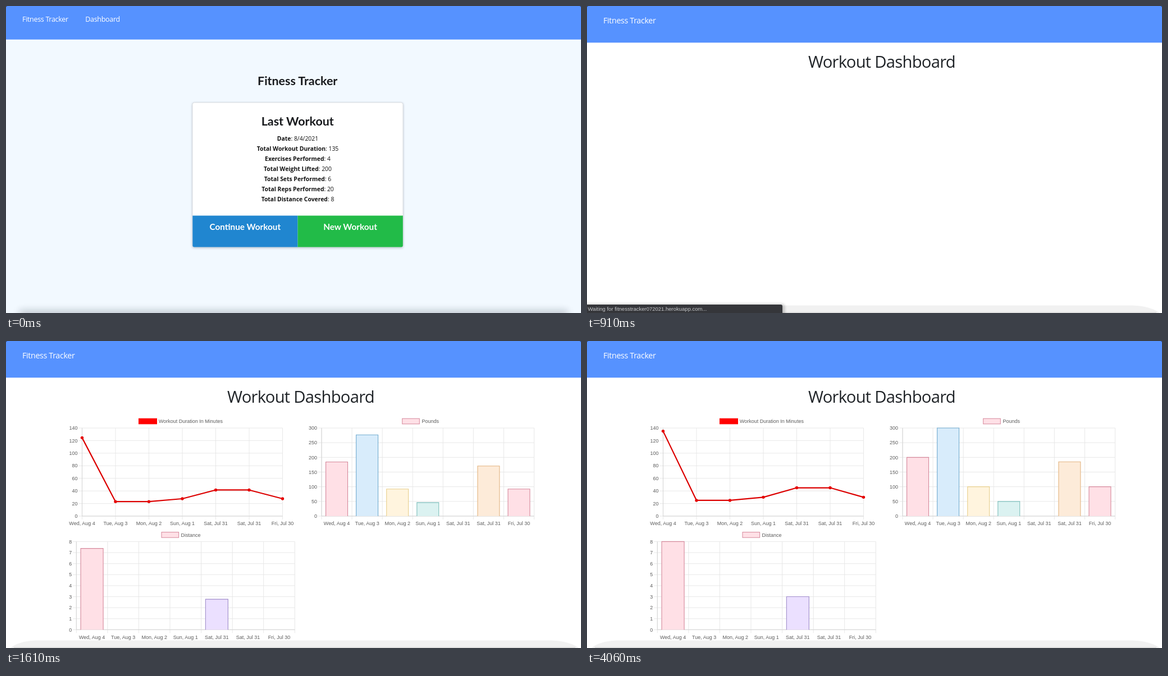
An HTML page that plays this animation: 1024x547 px, repeating every 4550 ms.

```html
<!DOCTYPE html>
<html lang="en">
<head>
<meta charset="utf-8">
<title>Fitness Tracker</title>
<style>
  html, body { margin: 0; width: 100%; height: 100%; overflow: hidden; background: #fff; }
  svg { display: block; width: 100%; height: 100%; }
  .ui { font-family: "Open Sans", "Noto Sans", sans-serif; letter-spacing: -.025em; }
  .lato { font-family: Lato, sans-serif; font-weight: 700; }
  .list { font: 10.4px "Open Sans", "Noto Sans", sans-serif; fill: #111; }
  .list tspan { font-weight: 700; }
  .small { font-family: "Liberation Sans", Arial, sans-serif; font-size: 9px; fill: #5c5c5c; }
  .mid { text-anchor: middle; }
  .end { text-anchor: end; }
  .nav { fill: #5692ff; }

  .home, .hover, .status, .charts { animation: 4.55s -12ms infinite step-end; }
  .home { animation-name: home; }
  .hover { animation-name: hover; }
  .status { animation-name: status; }
  .charts { animation-name: charts; }

  @keyframes home { 0% { opacity: 1; } 20%, 100% { opacity: 0; } }
  @keyframes charts { 0% { opacity: 0; } 26.1538%, 100% { opacity: 1; } }
  @keyframes hover {
    0% { opacity: 0; }
    3.0769% { opacity: 0; animation-timing-function: steps(4, start); }
    9.2308%, 100% { opacity: 1; }
  }
  @keyframes status {
    0% { opacity: 0; }
    7.6923% { opacity: 0; animation-timing-function: steps(4, end); }
    13.8462% { opacity: 1; }
    26.1538% { opacity: 1; animation-timing-function: steps(4, end); }
    32.3077%, 100% { opacity: 0; }
  }
</style>
</head>
<body>
<svg viewBox="0 0 1024 547" preserveAspectRatio="none">
  <defs>
    <filter id="soft" x="-10%" y="-400%" width="120%" height="900%"><feGaussianBlur stdDeviation="7"/></filter>
    <filter id="shade" x="-5%" y="-5%" width="110%" height="112%"><feGaussianBlur stdDeviation="2"/></filter>
    <filter id="halo" x="-5%" y="-100%" width="110%" height="300%"><feGaussianBlur stdDeviation="2.5"/></filter>
  </defs>

  <g class="dashboard">
    <rect width="1024" height="547" fill="#fff"/>
    <rect class="nav" width="1024" height="65.3"/>
    <text class="ui" x="29" y="31.3" font-size="14.3" fill="#fff">Fitness Tracker</text>
    <text class="ui mid" x="525" y="110" font-size="29.2" fill="#1f2327">Workout Dashboard</text>
    <path d="M8 547Q22 535 52 533.5H972Q1004 535 1020 547Z" fill="#f1f1f1"/>
    <path d="M14 546.3H1014" stroke="#dadada" stroke-width="1.4"/>
    <g class="charts" id="charts"></g>
  </g>

  <g class="home">
    <rect width="1024" height="547" fill="#f2f9ff"/>
    <rect class="nav" width="1024" height="59.7"/>
    <g class="ui" font-size="12.5" fill="#fff">
      <text x="29" y="28.3">Fitness Tracker</text>
      <text class="mid" x="172" y="28.3">Dashboard</text>
      <g class="hover">
        <rect x="129.3" y="2" width="86.4" height="42.3"/>
        <text class="nav mid" x="172" y="28.3">Dashboard</text>
      </g>
    </g>
    <rect x="24" y="543" width="976" height="14" fill="#0a1428" opacity=".24" filter="url(#soft)"/>

    <rect x="332" y="173" width="375" height="258" rx="3" fill="#1e2840" opacity=".28" filter="url(#shade)"/>
    <rect x="332" y="172" width="375" height="257.5" rx="3.5" fill="#fff" stroke="#d2d6da" stroke-width=".8"/>
    <path d="M332.3 373.4H519.5V429.5H335.3a3 3 0 0 1-3-3Z" fill="#2086d0"/>
    <path d="M519.5 373.4H706.8V426.5a3 3 0 0 1-3 3H519.5Z" fill="#22bb48"/>
    <g class="lato mid" fill="#17191c">
      <text x="519.2" y="141.4" font-size="21.4">Fitness Tracker</text>
      <text x="519.2" y="212.6" font-size="21.4">Last Workout</text>
      <g font-size="15.3" fill="#fff">
        <text x="425.8" y="398.8">Continue Workout</text>
        <text x="613" y="398.8">New Workout</text>
      </g>
    </g>
    <g class="list mid" id="summary"></g>
  </g>

  <g class="status">
    <rect x="-10" y="531" width="362" height="24" rx="5" opacity=".22" filter="url(#halo)"/>
    <path d="M0 532H345a3 3 0 0 1 3 3V547H0Z" fill="#35363a"/>
    <text class="small" x="1.5" y="543" style="font-size:9.5px;fill:#c8cacd">Waiting for fitnesstracker072021.herokuapp.com...</text>
  </g>

  <path d="M0 0H3Q0 0 0 3ZM1024 0H1021Q1024 0 1024 3Z" fill="#1c2f55"/>
</svg>

<script>
  const LOOP = 4550, BEAT = 70, LEAD = 12, START = 1138, GROW = 1000;
  const days = ['Wed, Aug 4', 'Tue, Aug 3', 'Mon, Aug 2', 'Sun, Aug 1', 'Sat, Jul 31', 'Sat, Jul 31', 'Fri, Jul 30'];
  const fills = ['#ffe0e6', '#d8ecfb', '#fff4de', '#dbf2f1', '#ebe0ff', '#fdebd9', '#ffe0e6'];
  const edges = ['#d5889b', '#72abd0', '#e8cf8c', '#7fbfbc', '#a18dcb', '#e2b480', '#d5889b'];

  const charts = [
    { title: 'Workout Duration In Minutes', line: true, left: 135.5, right: 492.5, top: 155, max: 140, step: 20,
      key: 236.5, keyW: 32, text: 272, data: [135, 25, 25, 30, 45, 45, 30] },
    { title: 'Pounds', left: 562, right: 940.5, top: 155, max: 300, step: 50,
      key: 705.7, keyW: 30.6, text: 740.5, data: [200, 300, 100, 50, 0, 185, 100] },
    { title: 'Distance', left: 125.3, right: 514.3, top: 357.4, max: 8, step: 1,
      key: 277, keyW: 30.6, text: 311.5, data: [8, 0, 0, 0, 3, 0, 0] }
  ];
  const HEIGHT = 157;

  const svg = (parent, tag, attrs, text = '') => {
    const el = document.createElementNS('http://www.w3.org/2000/svg', tag);
    for (const k in attrs) el.setAttribute(k, attrs[k]);
    el.textContent = text;
    return parent.appendChild(el);
  };

  const rows = [['Date', '8/4/2021'], ['Total Workout Duration', 135], ['Exercises Performed', 4],
    ['Total Weight Lifted', 200], ['Total Sets Performed', 6], ['Total Reps Performed', 20], ['Total Distance Covered', 8]];
  rows.forEach(([label, value], i) => {
    const row = svg(summary, 'text', { x: 519.5, y: 239.8 + 18 * i });
    svg(row, 'tspan', {}, label);
    row.append(': ' + value);
  });

  function build(c) {
    const g = svg(document.getElementById('charts'), 'g', { fill: 'none' });
    const { left, right, top } = c;
    const base = c.base = top + HEIGHT;
    const gap = c.gap = (right - left) / (c.line ? 6 : 7);
    const label = (cls, x, y, s) => svg(g, 'text', { class: 'small ' + cls, x, y }, s);

    let grid = '';
    for (let v = 0; v <= c.max; v += c.step) {
      const y = base - HEIGHT * v / c.max;
      grid += `M${left - 6} ${y}H${right}`;
      label('end', left - 8, y + 3.2, v);
    }
    for (let x = left; x < right + 1; x += gap) grid += `M${x} ${top}V${base + 6}`;
    svg(g, 'path', { d: grid, stroke: '#e6e6e6', 'stroke-width': .9 });
    svg(g, 'path', { d: `M${left} ${top}V${base}H${right}`, stroke: '#cfcfcf', 'stroke-width': .8 });
    days.forEach((d, i) => label('mid', left + gap * (c.line ? i : i + .5), base + 16.4, d));

    svg(g, 'rect', { x: c.key, y: top - 16.8, width: c.keyW, height: 9.6,
      fill: c.line ? '#f00' : fills[0], stroke: c.line ? '#f00' : edges[0] });
    label('', c.text, top - 8.9, c.title);

    if (c.line) {
      c.path = svg(g, 'path', { stroke: '#dc0000', 'stroke-width': 2.2, 'stroke-linejoin': 'round' });
      c.dots = c.data.map((_, i) => svg(g, 'circle', { cx: left + gap * i, r: 2.7, fill: '#e60000' }));
    } else {
      c.bars = c.data.map((v, i) => v && svg(g, 'path', { fill: fills[i], stroke: edges[i], 'stroke-width': 1.1 }));
    }
  }

  function draw(c, p) {
    const tops = c.data.map(v => c.base - HEIGHT * v / c.max * p);
    if (c.line) {
      c.path.setAttribute('d', 'M' + tops.map((y, i) => `${c.left + c.gap * i} ${y}`).join('L'));
      c.dots.forEach((dot, i) => dot.setAttribute('cy', tops[i]));
    } else {
      const w = c.gap * .72;
      c.bars.forEach((bar, i) => {
        const x = c.left + c.gap * (i + .5) - w / 2;
        if (bar) bar.setAttribute('d', `M${x} ${c.base}V${tops[i]}H${x + w}V${c.base}`);
      });
    }
  }

  let origin;
  function tick(now) {
    origin ??= now;
    const t = Math.floor((now - origin + LEAD) % LOOP / BEAT) * BEAT;
    const k = Math.min(1, Math.max(0, (t - START) / GROW));
    const p = 1 - (1 - k) ** 4; // ease-out quart
    charts.forEach(c => draw(c, p));
    requestAnimationFrame(tick);
  }

  charts.forEach(build);
  requestAnimationFrame(tick);
</script>
</body>
</html>
```
